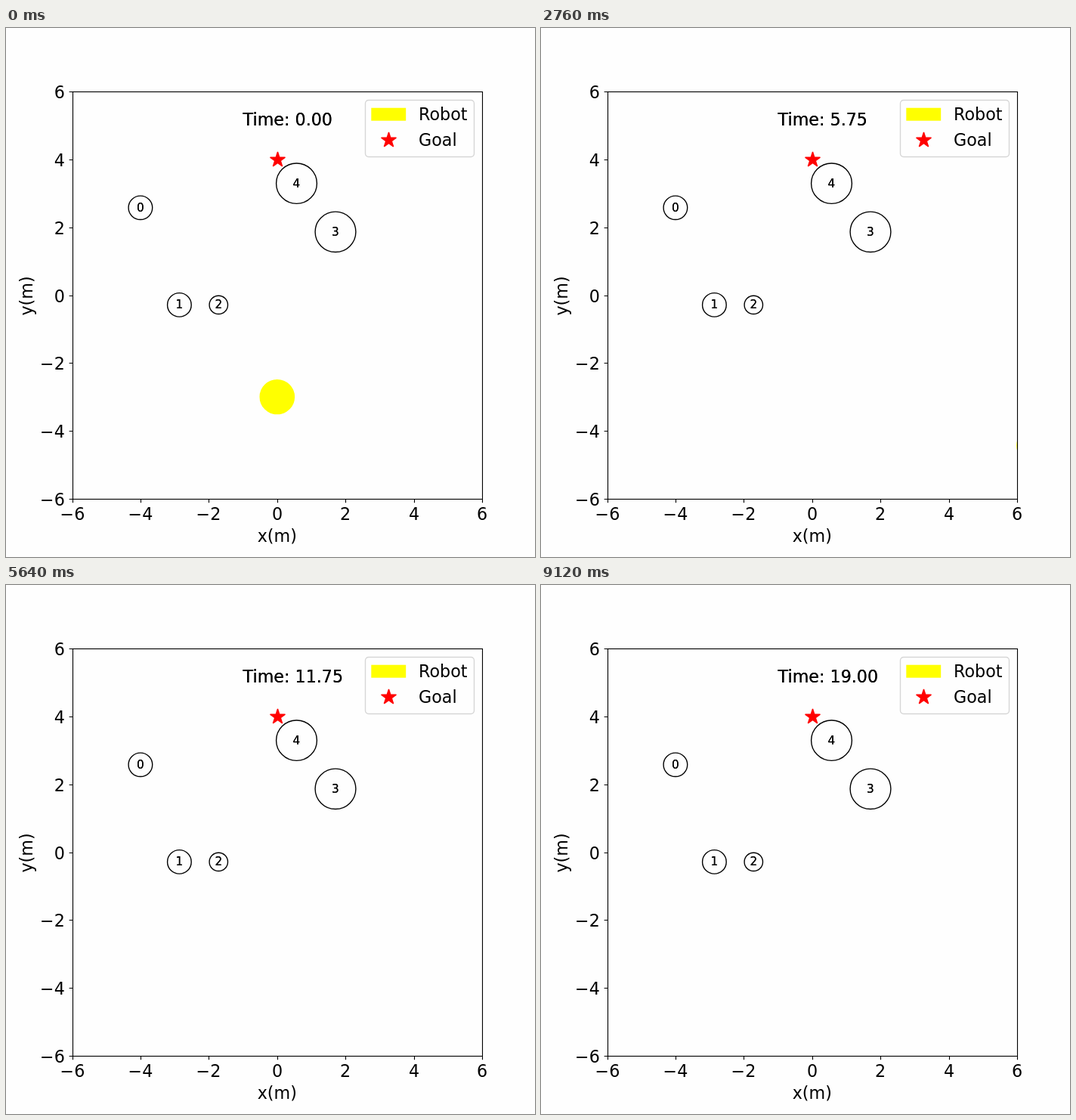
Write an HTML page that moves like this. It is 700x700 px and loops after 9.24 s.

```html
<!DOCTYPE html>
<html lang="en">
<head>
<meta charset="utf-8">
<title>Robot navigation</title>
<style>
  html, body { margin: 0; width: 100%; height: 100%; overflow: hidden; background: #fefefe; }
  svg { display: block; width: 100vw; height: 100vh; }
  text { font: 22.22px "DejaVu Sans", sans-serif; fill: #000; white-space: pre; }
  .middle { text-anchor: middle; }
  .end { text-anchor: end; }
  .small { font-size: 15.28px; }
  .axis { fill: none; stroke: #000; stroke-width: 1.11; }
  .person { fill: none; stroke: #000; stroke-width: 1.39; }
  .robot { fill: #ff0; stroke: #ff0; stroke-width: 1.39; }
  .star { fill: #f00; stroke: #f00; stroke-width: 1.39; stroke-linejoin: bevel; }
  .legend { fill: #fefefe; stroke: #d6d6d6; stroke-width: 1.39; }
</style>
</head>
<body>
<svg id="stage" viewBox="0 0 700 700">
  <clipPath id="plot"><rect x="88" y="84" width="542" height="539"/></clipPath>
</svg>
<script>
const STEP_MS = 120, STEPS = 77, STEP_TIME = 0.25;
const UNIT_X = 45.21, UNIT_Y = 44.92;
const stage = document.getElementById('stage');

function add(tag, attrs, content = '', parent = stage) {
  const node = document.createElementNS('http://www.w3.org/2000/svg', tag);
  for (const key in attrs) node.setAttribute(key, attrs[key]);
  node.textContent = content;
  return parent.appendChild(node);
}
const label = (x, y, content, cls = '') => add('text', { x, y, class: cls }, content);
// Labels inside the plot are painted twice, which darkens their edges.
const boldLabel = (...args) => [label(...args), label(...args)];

function star(cx, cy) {
  const points = Array.from({ length: 10 }, (_, i) => {
    const r = i % 2 ? 3.98 : 10.42, a = i * Math.PI / 5;
    return `${cx + r * Math.sin(a)},${cy - r * Math.cos(a)}`;
  });
  add('polygon', { points: points.join(' '), class: 'star' });
}

const clipped = add('g', { 'clip-path': 'url(#plot)' });
const robot = add('ellipse', { rx: 22.6, ry: 22.46, class: 'robot' }, '', clipped);

const people = [
  [177.9, 237.8, 0.35], [229.4, 366.4, 0.35], [281.3, 366.4, 0.27],
  [436, 269.8, 0.595], [384.5, 205.7, 0.595]
];
people.forEach(([cx, cy, r], i) => {
  add('ellipse', { cx, cy, rx: r * UNIT_X, ry: r * UNIT_Y, class: 'person' });
  boldLabel(cx - 4.9, cy + 5, i, 'small');
});

add('rect', { x: 88.5, y: 84.5, width: 542, height: 539, class: 'axis' });
for (let value = -6; value <= 6; value += 2) {
  const x = Math.round(358.76 + value * UNIT_X) + 0.5;
  const y = Math.round(353.5 - value * UNIT_Y) + 0.5;
  const name = String(value).replace('-', '\u2212');
  add('path', { d: `M${x} 623.5v4.86M88.5 ${y}h-4.86`, class: 'axis' });
  label(x - 0.5, 651, name, 'middle');
  label(77.8, y + 8, name, 'end');
}
label(358.75, 680, 'x(m)', 'middle');
add('text', { transform: 'translate(34.5 354.5) rotate(-90)', class: 'middle' }, 'y(m)');

star(359.5, 174.5);
const clock = boldLabel(313.6, 129, '');

add('rect', { x: 475.5, y: 95.5, width: 144, height: 75, rx: 4.4, class: 'legend' });
add('rect', { x: 484, y: 106.4, width: 44.5, height: 15.6, class: 'robot' });
star(506.5, 148.5);
label(546, 122, 'Robot');
label(546, 156, 'Goal');

// Waypoints: step, position, velocity per step
const path = [
  { s: 0, p: [358.8, 488.2], v: [1, -4] },
  { s: 9, p: [430.6, 467.1], v: [15.5, 0] },
  { s: 16.5, p: [529.4, 505.3], v: [17.3, 9.5] },
  { s: 23, p: [652.5, 552.5], v: [19, 6.8] }
];

function robotAt(step) {
  const k = Math.max(0, path.findLastIndex((w, i) => w.s <= step && i < path.length - 1));
  const a = path[k], b = path[k + 1], span = b.s - a.s;
  const u = Math.min(1, (step - a.s) / span), w = 1 - u;
  return [0, 1].map(i =>
    w * w * ((1 + 2 * u) * a.p[i] + u * span * a.v[i]) +
    u * u * ((1 + 2 * w) * b.p[i] - w * span * b.v[i]));
}

function draw(now) {
  const step = Math.floor(now / STEP_MS) % STEPS;
  const [x, y] = robotAt(step);
  robot.setAttribute('cx', x);
  robot.setAttribute('cy', y);
  robot.setAttribute('visibility', step > 23 ? 'hidden' : 'visible');
  for (const line of clock) line.textContent = 'Time: ' + (step * STEP_TIME).toFixed(2);
}

const start = performance.now();
function tick() {
  draw(performance.now() - start);
  requestAnimationFrame(tick);
}
tick();
</script>
</body>
</html>
```
